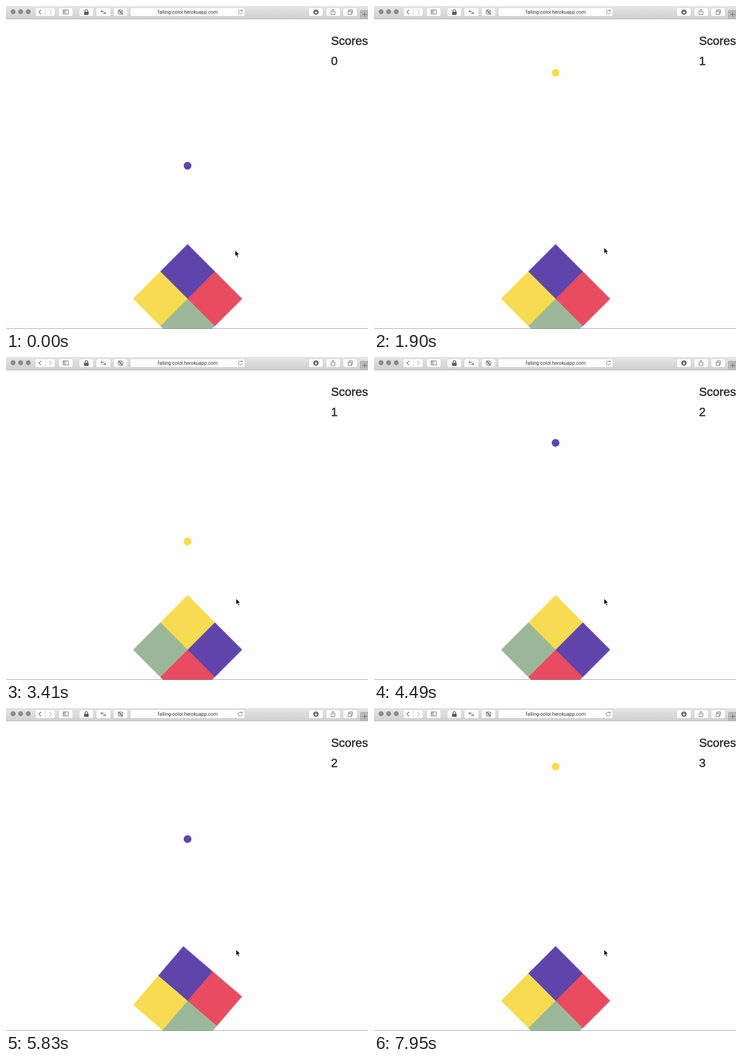
Recreate the animation shown at these times as an HTML page. Size 793 by 706 pixels, loop 8 s.

```html
<!DOCTYPE html>
<html lang="en">
<head>
<meta charset="utf-8">
<title>Falling color</title>
<style>
  html, body { margin: 0; width: 100%; height: 100%; overflow: hidden; background: #fefefe; }
  svg { display: block; width: 793px; height: 706px; }
  .button { fill: #fdfdfd; stroke: #c3c3c3; stroke-width: .6; }
  .icon { fill: none; stroke: #5c5c5c; stroke-width: 1; }
  .solid { fill: #5c5c5c; stroke: none; }
  .address { font: 10.6px Roboto, sans-serif; fill: #333; }
  .heading { font: 26px "Liberation Sans", sans-serif; fill: #333; stroke: #333; stroke-width: .75; }
</style>
</head>
<body>
<svg viewBox="0 0 793 706" xmlns="http://www.w3.org/2000/svg">
  <defs>
    <linearGradient id="bar" x2="0" y2="1">
      <stop offset="0" stop-color="#e5e5e5"/>
      <stop offset="1" stop-color="#d0d0d0"/>
    </linearGradient>
  </defs>
  <rect width="793" height="706" fill="#fefefe"/>

  <rect width="793" height="28" fill="url(#bar)"/>
  <rect y="28" width="793" height="1" fill="#b2b2b2"/>
  <rect x="776" y="9" width="17" height="19" fill="#bababa"/>
  <path d="M776.5 28V9.5H793" fill="none" stroke="#a2a2a2"/>
  <path class="icon" d="M781 18.5H791M786 13.5V23.5"/>
  <g fill="#8c8c8c" stroke="#747474" stroke-width=".8">
    <circle cx="15.5" cy="12.5" r="4.9"/>
    <circle cx="32" cy="12.5" r="4.9"/>
    <circle cx="48.7" cy="12.5" r="4.9"/>
  </g>
  <g id="buttons"></g>
  <path d="M86.5 4V22.5" stroke="#d2d2d2"/>

  <g class="icon">
    <path d="M77 8.5L72 13.3L77 18.1" stroke-width="1.2"/>
    <path d="M94.5 8.5L99.5 13.3L94.5 18.1" stroke="#bcbcbc" stroke-width="1.2"/>
    <path d="M125 8.5H136.5V17.5H125ZM129.5 8.5V17.5M126 10.5H128M126 12.5H128M126 14.5H128"/>
    <rect class="solid" x="171" y="12.5" width="10" height="7" rx="1"/>
    <path d="M173 13V11A3 3 0 0 1 179 11V13" stroke-width="1.5"/>
    <path d="M209 11.5H215.5M210.5 15.5H218"/>
    <path class="solid" d="M207 11.5L210.5 9V14ZM219.5 15.5L216 13V18Z"/>
    <circle cx="250.8" cy="13.3" r="5" stroke-width="1.3"/>
    <circle cx="250.8" cy="13.3" r="1.8"/>
    <path d="M246 8L256 18.7" stroke-width="1.3"/>
    <path d="M516.4 10.2A4.2 4.2 0 1 0 517.7 13.5M517.3 7.8V10.8H514.2"/>
    <circle class="solid" cx="679" cy="13.3" r="5.8"/>
    <path d="M679 9.8V15M676.3 13.2L679 16L681.7 13.2" stroke="#fff" stroke-width="1.5"/>
    <path d="M714.5 11.5H712V18.8H720.5V11.5H718M716.3 15V7.5M713.8 9.7L716.3 7.2L718.8 9.7"/>
    <path d="M749.5 11.5H756.5V18.5H749.5ZM751.5 11.5V8.5H759V16H756.5"/>
  </g>
  <text class="address" x="398" y="17.3" text-anchor="middle">falling-color.herokuapp.com</text>

  <g class="heading">
    <text x="712" y="85">Scores</text>
    <g id="scores"></g>
  </g>

  <g transform="translate(397.8 639.9)">
    <g id="diamond">
      <g transform="rotate(45)">
        <path d="M-84.6-84.6H0V0H-84.6Z" fill="#5f45ab"/>
        <path d="M0-84.6H84.6V0H0Z" fill="#e94b60"/>
        <path d="M0 0H84.6V84.6H0Z" fill="#9ab899"/>
        <path d="M-84.6 0H0V84.6H-84.6Z" fill="#f7db50"/>
      </g>
    </g>
  </g>
  <circle id="ball" cx="397.7" cy="0" r="8.5"/>
  <rect y="705" width="793" height="1" fill="#929292"/>
  <path id="cursor" d="M0 0V13.2L3 10.5L5.2 15.4L7.3 14.4L5.1 9.7H9.2Z" fill="#000" stroke="#fff" stroke-width=".9"/>
</svg>
<script>
const LOOP = 8000;
const $ = id => document.getElementById(id);

function add(parent, tag, attributes, text = '') {
  const node = document.createElementNS('http://www.w3.org/2000/svg', tag);
  for (const key in attributes) node.setAttribute(key, attributes[key]);
  node.textContent = text;
  return parent.appendChild(node);
}

// Each step is [time, value, easing towards the next step].
function play(node, property, steps, format = value => value, easing = 'linear') {
  const frames = steps.map(([time, value, ease = easing]) =>
    ({ offset: time / LOOP, [property]: format(value), easing: ease }));
  frames.push({ ...frames[frames.length - 1], offset: 1 });
  node.animate(frames, { duration: LOOP, iterations: Infinity });
}

const buttons = [[64, 43], [115, 31], [160, 31], [197, 32], [235, 31],
                 [272, 251], [663, 31], [701, 31], [738, 31]];
for (const [x, width] of buttons) {
  add($('buttons'), 'rect', { class: 'button', x: x + .3, y: 4, width, height: 18.5, rx: 3.5 });
}

const REBOUND = 'cubic-bezier(.65,0,.35,1)';
play($('ball'), 'transform', [
  [0, 349], [985, 520, REBOUND],
  [1592, 126], [1740, 126], [1795, 128], [2360, 224], [3290, 382.5], [4090, 520, REBOUND],
  [4697, 126], [4860, 126], [5240, 188], [5830, 286.3], [7195, 520, REBOUND],
  [7802, 126], [7915, 126], [7950, 128], [7999, 136]
], y => `translateY(${y}px)`);

play($('diamond'), 'transform', [
  [0, 0], [2072, 0, 'ease'], [2472, 90],
  [4700, 90, 'ease'], [5100, 180],
  [5250, 180, 'ease'], [5542, 270, 'ease'], [5942, 360]
], angle => `rotate(${angle}deg)`);

play($('cursor'), 'transform', [[0, [502, 534]], [100, [502, 534], 'ease'], [400, [504, 528]]],
  ([x, y]) => `translate(${x}px, ${y}px)`);

const hits = [0, 1100, 4205, 7310];
play($('ball'), 'fill', hits.map((time, i) => [time, i % 2 ? '#f7db50' : '#5f45ab']), undefined, 'steps(1)');
hits.forEach((_, score) => {
  const digit = add($('scores'), 'text', { x: 712, y: 129 }, String(score));
  play(digit, 'opacity', hits.map((time, i) => [time, i === score ? 1 : 0]), undefined, 'steps(1)');
});
</script>
</body>
</html>
```
